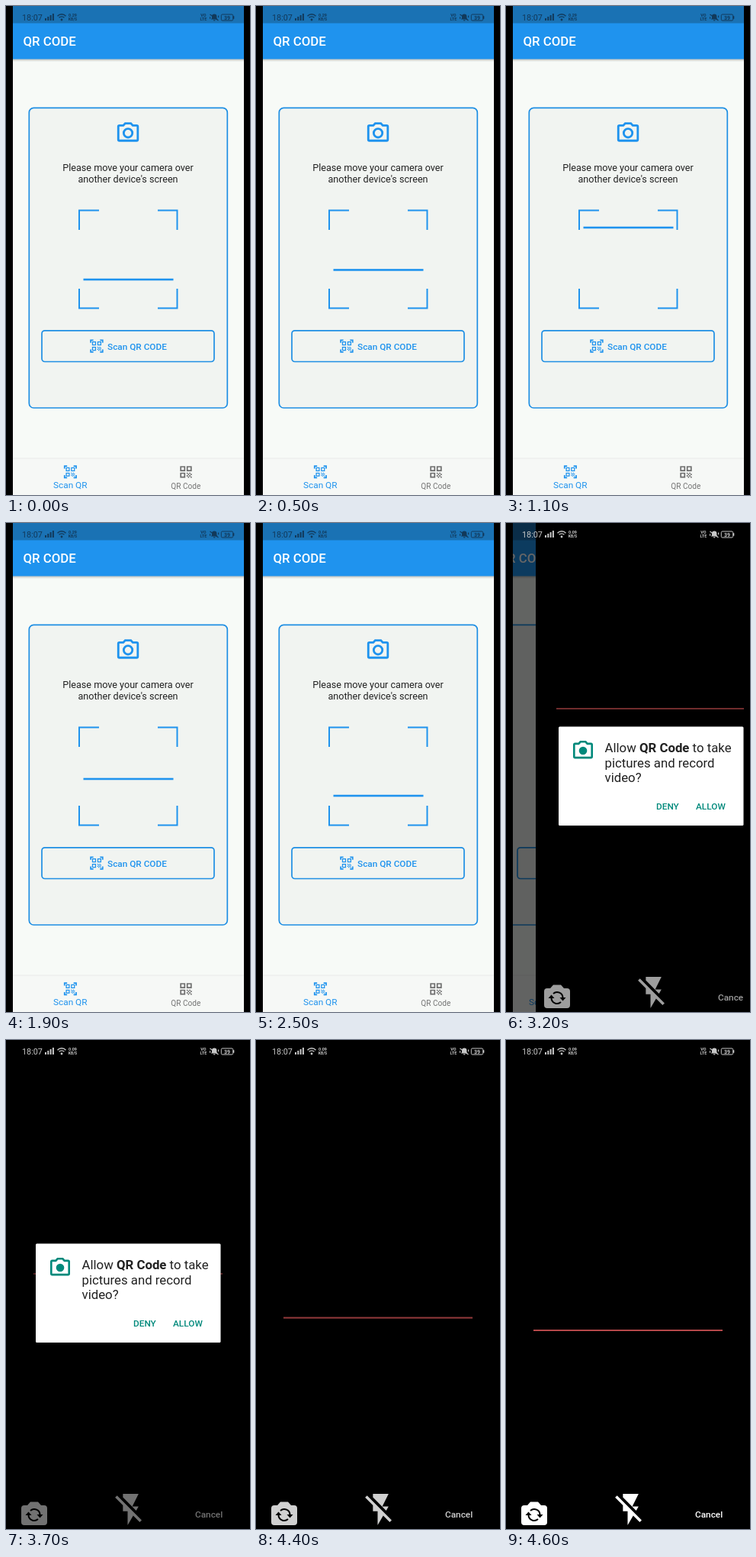
An HTML page for the animation above (5 s loop, 320 by 640 pixels).

```html
<!DOCTYPE html>
<html lang="en">
<head>
<meta charset="utf-8">
<title>Scanner app</title>
<style>
  html, body { margin: 0; width: 100%; height: 100%; overflow: hidden; background: #000; }
  svg { display: block; width: 100%; height: 100%; }
  text { font-family: Roboto, "Noto Sans", sans-serif; }
  .blue { fill: #1f93ee; }
  .line { fill: none; stroke: #1f93ee; stroke-width: 2; }
  .box { fill: #f1f4f1; stroke: #1f8fe4; stroke-width: 1.7; }
  .mid { text-anchor: middle; }
  .bold { font-weight: 500; }
  .teal { fill: #00897b; }
</style>
</head>
<body>
<svg viewBox="0 0 320 640">
  <defs>
    <clipPath id="screen"><rect x="9" width="303" height="640"/></clipPath>
    <linearGradient id="shade" x2="0" y2="1">
      <stop stop-color="#000" stop-opacity=".25"/>
      <stop offset="1" stop-color="#000" stop-opacity="0"/>
    </linearGradient>
    <path id="camera" d="M4 5h3.6l1.8-2h5.2l1.8 2H20a1 1 0 0 1 1 1v12a1 1 0 0 1-1 1H4a1 1 0 0 1-1-1V6a1 1 0 0 1 1-1z"/>
    <g id="code"></g>
    <g id="codeScan"></g>
  </defs>
  <rect width="320" height="640"/>
  <g clip-path="url(#screen)">
    <g id="app">
      <rect width="352" height="640" fill="#f7faf7"/>
      <rect y="69" width="352" height="4" fill="url(#shade)"/>
      <rect width="352" height="69.5" class="blue"/>
      <rect width="352" height="22.5" fill="#1a72b4"/>
      <text x="22.5" y="52" font-size="16.8" class="bold" fill="#fff">QR CODE</text>

      <rect x="30.3" y="133.4" width="260" height="392.6" rx="6" class="box"/>
      <g class="line" transform="translate(143 149.3) scale(1.42)">
        <use href="#camera"/><circle cx="12" cy="12" r="4"/>
      </g>
      <g font-size="12.6" class="mid" fill="#222">
        <text x="160" y="216">Please move your camera over</text>
        <text x="160" y="231">another device's screen</text>
      </g>
      <path class="line" d="M96 293V267.5H122M199 267.5H224.5V293M224.5 370V395.5H199M122 395.5H96V370"/>
      <rect id="beam" x="101.5" y="-1.3" width="118" height="2.6" class="blue"/>

      <rect x="47" y="424.8" width="226" height="40.7" rx="4" class="box"/>
      <use href="#codeScan" class="blue" transform="translate(108.5 434.7) scale(.87)"/>
      <text x="133" y="449.5" font-size="11.8" class="bold blue">Scan QR CODE</text>

      <rect y="592" width="352" height="48" fill="#f6f8f6"/>
      <rect y="591.5" width="352" height="1" fill="#e9ece9"/>
      <use href="#codeScan" class="blue" transform="translate(74.2 599.6) scale(.85)"/>
      <text x="84.3" y="631" font-size="11.8" class="mid blue">Scan QR</text>
      <use href="#code" fill="#6d6d6d" transform="translate(225.8 599.6) scale(.85)"/>
      <text x="235.8" y="632" font-size="10.1" class="mid" fill="#757575">QR Code</text>
    </g>
    <rect id="dim" width="320" height="640"/>

    <g id="scanner">
      <rect x="9" width="303" height="640"/>
      <g id="tools">
        <rect id="laser" x="36" y="-1" width="248" height="2" fill="#b5484a"/>
        <path fill="#fff" d="M24 609h4l4-4.5h10l4 4.5h4a4 4 0 0 1 4 4v18a4 4 0 0 1-4 4H24a4 4 0 0 1-4-4v-18a4 4 0 0 1 4-4z"/>
        <g id="arrows" transform="translate(37 621.5)"></g>
        <path fill="#fff" transform="translate(139 590) scale(2.05)"
          d="M3.27 3L2 4.27l5 5V13h3v9l3.58-6.14L17.73 20 19 18.73zM17 10h-4l4-8H7v2.18l8.46 8.46z"/>
        <text x="248" y="624.5" font-size="11.8" class="bold" fill="#fff">Cancel</text>
      </g>
      <g id="dialog">
        <rect x="39" y="266.5" width="242.5" height="129.5" rx="1.5" fill="#fff"/>
        <g transform="translate(55.4 282.4) scale(1.3)">
          <use href="#camera" fill="none" stroke="#00897b" stroke-width="2"/>
          <circle cx="12" cy="12" r="4.1" class="teal"/>
        </g>
        <g font-size="16.8" fill="#212121">
          <text x="99.5" y="300">Allow <tspan font-weight="700">QR Code</tspan> to take</text>
          <text x="99.5" y="319.5">pictures and record</text>
          <text x="99.5" y="339">video?</text>
        </g>
        <rect id="press" x="211" y="356" width="55" height="28" rx="2" fill="#000"/>
        <g font-size="11.8" class="bold teal">
          <text x="167" y="374.5">DENY</text>
          <text x="219" y="374.5">ALLOW</text>
        </g>
      </g>
    </g>

    <g id="status">
      <text x="21" y="19" font-size="10.8">18:07</text>
      <path d="M51 16h2v3h-2zM54.3 14h2v5h-2zM57.6 12h2v7h-2zM60.9 10h2v9h-2z"/>
      <g fill="none" stroke="currentColor" stroke-width="1.4">
        <path d="M67.5 13.2a7.5 7.5 0 0 1 11 0M69.6 15.3a4.7 4.7 0 0 1 6.8 0"/>
        <path d="M283.8 11h12.4a1.5 1.5 0 0 1 1.5 1.5v5a1.5 1.5 0 0 1-1.5 1.5h-12.4a1.5 1.5 0 0 1-1.5-1.5v-5a1.5 1.5 0 0 1 1.5-1.5z" stroke-width="1"/>
        <path d="M267.5 11l11 8M267.6 14.2v2.6M278.6 12.6v2.6" stroke-width="1.2"/>
      </g>
      <circle cx="73" cy="18" r="1.4"/>
      <path d="M268.8 17.5l1.2-1.5v-2.2a3.2 3.2 0 0 1 6.4 0v2.2l1.2 1.5zM271.9 18.2h2.6a1.3 1.3 0 0 1-2.6 0zM298 13.3h1.3v3.4H298z"/>
      <g font-size="5.4" class="mid" font-weight="700">
        <text id="rate" x="87.5" y="14"></text>
        <text x="87.5" y="19.3" font-size="5">KB/S</text>
        <text x="258.8" y="14">VO</text>
        <text x="258.8" y="19.3">LTE</text>
        <text x="290" y="17.5" font-size="7">39</text>
      </g>
    </g>
  </g>
</svg>
<script>
const LOOP = 5000, STEP = 100, OPEN = 3100;
const $ = id => document.getElementById(id);

// [time, value] tables, read with straight lines between the points
const beamY = [[0, 358], [180, 375], [1100, 290], [1260, 275], [1900, 335], [2320, 375], [3000, 307]];
const slide = [[3000, 303], [3100, 150], [3200, 30], [3300, 6], [3400, 0]];
const laserY = [[3100, 230], [3200, 243], [3700, 306], [4600, 380]];
const toolsLight = [[3100, .75], [3200, .62], [3400, .45], [4200, .45], [4500, 1]];
const dialogAlpha = [[4200, 1], [4400, 0]];
const pressAlpha = [[3900, 0], [4100, .12], [4300, .12]];

function at(table, t) {
  if (t <= table[0][0]) return table[0][1];
  for (let i = 1; i < table.length; i++) {
    const [t0, a] = table[i - 1], [t1, b] = table[i];
    if (t <= t1) return a + (b - a) * (t - t0) / (t1 - t0);
  }
  return table[table.length - 1][1];
}

// Small menu glyphs on a 24-unit grid
function glyph(min, size, wall, dot) {
  const far = 24 - min - size;
  const box = (x, y) => `M${x} ${y}h${size}v${size}h${-size}z` +
    `m${wall} ${wall}v${size - 2 * wall}h${size - 2 * wall}v${2 * wall - size}z`;
  let d = box(min, min) + box(far, min) + box(min, far);
  for (let i = 0; i < 16; i++) {
    const c = i % 4, r = i >> 2;
    if ((c + r) % 2 === 0) d += `M${far + c * dot} ${far + r * dot}h${dot}v${dot}h${-dot}z`;
  }
  return `<path d="${d}"/>`;
}
$("code").innerHTML = glyph(3, 8, 2, 2);
$("codeScan").innerHTML = glyph(5, 6, 1.5, 1.5) +
  [0, 90, 180, 270].map(a => `<path d="M2 2h5v2H4v3H2z" transform="rotate(${a} 12 12)"/>`).join("");
$("arrows").innerHTML = [0, 180].map(a => `<g transform="rotate(${a})">
  <path d="M-5 -5.6A7.5 7.5 0 0 1 7.5 0" fill="none" stroke="#000" stroke-width="2"/>
  <path d="M3.5 -.5h8l-4 4.5z"/></g>`).join("");

const move = (id, x, y) => $(id).setAttribute("transform", `translate(${x} ${y})`);
const fade = (id, v) => $(id).setAttribute("opacity", v);
const show = (id, on) => $(id).style.display = on ? "" : "none";

function draw(t) {
  const open = t >= OPEN;
  const off = at(slide, t);
  const done = (303 - off) / 273;
  show("app", off > 0);
  move("app", open ? -32 * done : 0, 0);
  fade("dim", open ? .6 * Math.min(1, done) : 0);
  move("beam", 0, at(beamY, t));

  show("scanner", open);
  move("scanner", off, 0);
  move("laser", 0, at(laserY, t));
  fade("tools", at(toolsLight, t));
  fade("dialog", at(dialogAlpha, t));
  fade("press", at(pressAlpha, t));

  const ink = open ? "#c8c8c8" : "#12395a";
  $("status").setAttribute("fill", ink);
  $("status").setAttribute("color", ink);
  $("rate").textContent = open ? "0.09" : t >= 2500 ? "0.04" : "0.29";
}

const start = performance.now();
function tick() {
  const t = (performance.now() - start) % LOOP;
  draw(Math.floor(t / STEP) * STEP);
  requestAnimationFrame(tick);
}
tick();
</script>
</body>
</html>
```
